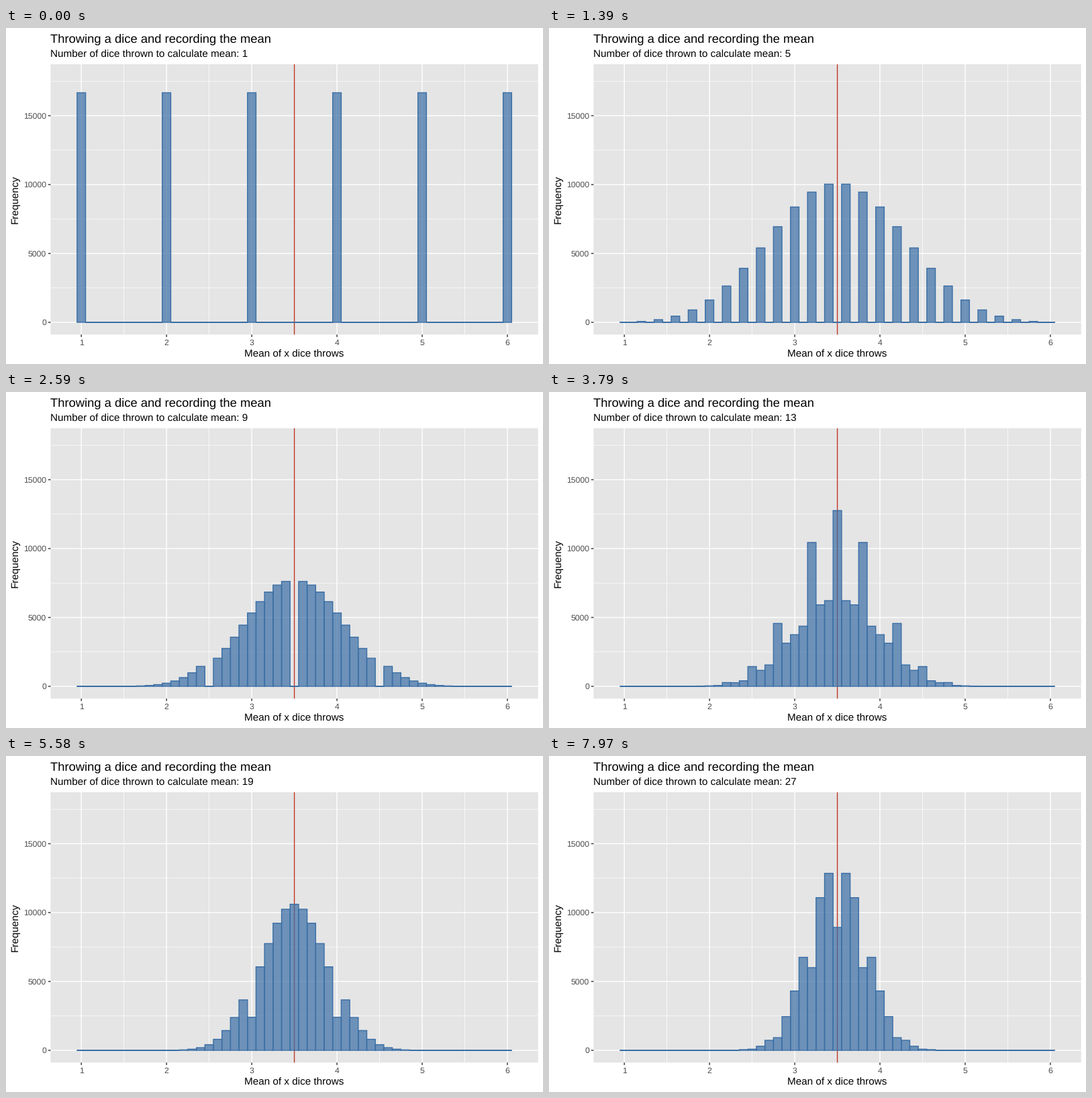
Recreate the animation shown at these times as a matplotlib script. Size 800 by 500 pixels, loop 8 s.

```python
import math

import matplotlib.pyplot as plt
import numpy as np
from matplotlib.animation import FuncAnimation
from matplotlib.collections import PolyCollection
from matplotlib.patches import Rectangle

plt.rcParams["font.family"] = "Liberation Sans"
plt.rcParams["text.hinting"] = "none"

WIDTH, HEIGHT, DPI = 800, 500, 100
PT = 72 / DPI                      # points per pixel
LOOP, TICK = 8000, 20              # ms
FIRST_HOLD, STEP = 500, 298.8      # ms
MAX_DICE = 27

LEFT, RIGHT, TOP, BOTTOM = 66.5, 792.67, 54, 456.2
X_UNIT, Y_UNIT = 126.95, 0.0205
LINE, THIN = 1.42, 0.71
TITLE, BODY, SMALL = 18.33, 15.3, 12.2
BLUE, RED, DARK, GREY = "#3A6EA5", "#C0392B", "#333333", "#4D4D4D"
THROWS = 100_000
BINS = 51


def px(value):
    return LEFT + (value - 0.64) * X_UNIT


def py(count):
    return 438 - count * Y_UNIT


def histogram(dice):
    """Expected counts per 0.1-wide bin for the mean of some dice."""
    chances = np.ones(1)
    for _ in range(dice):
        chances = np.convolve(chances, np.full(6, 1 / 6))
    means = np.arange(dice, 6 * dice + 1) / dice
    # Bins are closed on the right.
    index = np.ceil((means - 0.95) * 10 - 1e-6).astype(int) - 1
    return np.bincount(index, weights=chances * THROWS, minlength=BINS)


def bar_shapes(dice):
    shapes = []
    # A minimum height keeps the outline of empty bins evenly stroked.
    for i, count in enumerate(np.maximum(histogram(dice), 2)):
        x0, x1 = px(0.95 + i / 10), px(1.05 + i / 10)
        y0, y1 = py(0), py(count)
        shapes.append([(x0, y0), (x0, y1), (x1, y1), (x1, y0)])
    return shapes


fig = plt.figure(figsize=(WIDTH / DPI, HEIGHT / DPI), dpi=DPI, facecolor="white")
ax = fig.add_axes([0, 0, 1, 1])
ax.set_xlim(0, WIDTH)
ax.set_ylim(HEIGHT, 0)
ax.axis("off")


def line(xs, ys, color="white", width=LINE):
    ax.plot(xs, ys, color=color, lw=width * PT, zorder=2, snap=False,
            solid_capstyle="butt")


def label(x, y, text, size, color="black", **kw):
    return ax.text(x, y, text, fontsize=size * PT, color=color,
                   va="baseline", **kw)


def vertical(value, **kw):
    line([px(value)] * 2, [TOP, BOTTOM], **kw)


def horizontal(value, **kw):
    line([LEFT, RIGHT], [py(value)] * 2, **kw)


ax.add_patch(Rectangle((LEFT, TOP), RIGHT - LEFT, BOTTOM - TOP,
                       fc="#E5E5E5", ec="none", zorder=1, snap=False))
for i in range(5):
    vertical(i + 1.5, width=THIN)
for i in range(4):
    horizontal(5000 * i + 2500, width=THIN)
for value in range(1, 7):
    vertical(value)
    line([px(value)] * 2, [BOTTOM, BOTTOM + 3.67], DARK)
    label(px(value), 472, str(value), SMALL, GREY, ha="center")
for value in range(0, 15001, 5000):
    horizontal(value)
    line([LEFT - 3.67, LEFT], [py(value)] * 2, DARK)
    label(60, py(value) + 4.3, str(value), SMALL, GREY, ha="right")
vertical(3.5, color=RED)

label(LEFT, 21, "Throwing a dice and recording the mean", TITLE)
subtitle = label(LEFT, 44, "", BODY)
label((LEFT + RIGHT) / 2, 490, "Mean of x dice throws", BODY, ha="center")
label(18, (TOP + BOTTOM) / 2, "Frequency", BODY, ha="center",
      rotation=90, rotation_mode="anchor")

bars = PolyCollection([], facecolors=[(58 / 255, 110 / 255, 165 / 255, 0.7)],
                      edgecolors=BLUE, linewidths=LINE * PT,
                      joinstyle="miter", zorder=3)
bars.set_snap(False)
ax.add_collection(bars, autolim=False)

SHAPES = {dice: bar_shapes(dice) for dice in range(1, MAX_DICE + 1)}


def update(frame):
    # Look ahead within the tick so changes never come late.
    elapsed = frame * TICK + TICK - 2 - FIRST_HOLD
    dice = max(1, 2 + math.floor(elapsed / STEP))
    bars.set_verts(SHAPES[dice])
    subtitle.set_text(f"Number of dice thrown to calculate mean: {dice}")
    return bars, subtitle


anim = FuncAnimation(fig, update, frames=LOOP // TICK, interval=TICK,
                     init_func=lambda: update(0), repeat=True,
                     repeat_delay=0, blit=False)
plt.show()
```
